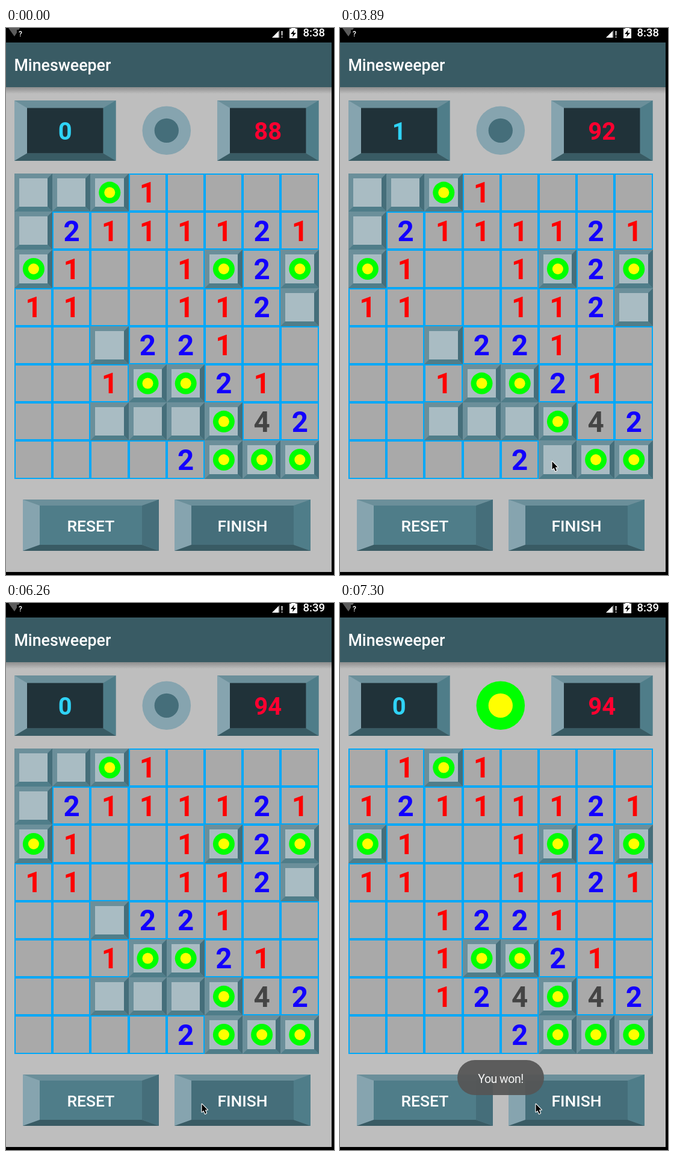
Animation of 545 by 906 pixels, one loop 8 s. Source, as an HTML page with a canvas:

```html
<!DOCTYPE html>
<html lang="en">
<head>
<meta charset="utf-8">
<title>Minesweeper</title>
<style>
html, body { margin: 0; width: 100%; height: 100%; overflow: hidden; background: #000; }
canvas { display: block; }
</style>
</head>
<body>
<canvas id="stage" width="545" height="906"></canvas>
<script>
const ctx = document.getElementById('stage').getContext('2d');
const LOOP = 8000, UNFLAG = 3440, REFLAG = 4790, WIN = 6710, TICK = 150;
const LIGHT = '#86a4af', MID = '#6b8f9a', TEAL = '#4f7d89', DEEP = '#456e7a', DARK = '#395b64';

// * mine, # safe but still covered, . open
const FIELD = [
  '##*.....',
  '#.......',
  '*....*.*',
  '.......#',
  '..#.....',
  '...**...',
  '..###*..',
  '.....***'
];
const LEFT = 14, TOP = 241, CELL = 63.2;
const COUNT_COLORS = ['', '#ff0000', '#1200ff', '', '#444444'];

// Pointer glides: start and end time, then where it goes.
const GLIDES = [
  [750, 750, 497, 521], [750, 900, 448, 522], [900, 1350, 324, 697], [1650, 2250, 364, 730],
  [2850, 3150, 352, 717], [5100, 5700, 226, 812], [5700, 6150, 325, 829]
];

const clamp = v => Math.min(1, Math.max(0, v));
const isMine = (col, row) => FIELD[row]?.[col] === '*';

function countMines(col, row) {
  let count = 0;
  for (let dy = -1; dy <= 1; dy++)
    for (let dx = -1; dx <= 1; dx++) count += isMine(col + dx, row + dy);
  return count;
}

function poly(color, ...p) {
  ctx.fillStyle = color;
  ctx.beginPath();
  for (let i = 0; i < p.length; i += 2) ctx.lineTo(p[i], p[i + 1]);
  ctx.closePath();
  ctx.fill();
}

function rect(color, x, y, w, h) {
  ctx.fillStyle = color;
  ctx.fillRect(x, y, w, h);
}

function disc(color, x, y, r) {
  ctx.fillStyle = color;
  ctx.beginPath();
  ctx.arc(x, y, r, 0, 7);
  ctx.fill();
}

function text(str, x, y, size, color = '#fff', weight = 500, align = 'center') {
  ctx.font = `${weight} ${size}px Roboto, sans-serif`;
  ctx.textAlign = align;
  ctx.fillStyle = color;
  ctx.fillText(str, x, y);
}

// Box with mitred edges; bx, by are the edge widths.
function bevel(x, y, w, h, bx, by, face, [left, top, right, bottom]) {
  const r = x + w, b = y + h;
  rect(top, x, y, w, h);
  poly(left, x, y, x + bx, y + by, x + bx, b - by, x, b);
  poly(right, r, y, r, b, r - bx, b - by, r - bx, y + by);
  poly(bottom, x, b, x + bx, b - by, r - bx, b - by, r, b);
  rect(face, x + bx, y + by, w - 2 * bx, h - 2 * by);
}

function rings(x, y, r, outer = '#00ff00', inner = '#ffff00') {
  disc(outer, x, y, r);
  disc(inner, x, y, r / 2);
}

function statusBar(t) {
  poly('#5c5c5c', 4, 0, 23, 0, 14, 14);
  rect('#000', 18, 3, 10, 14);
  text('?', 24, 14, 12);
  poly('#4d4d4d', 455, 3, 455, 16, 442, 16);
  poly('#fff', 453, 5, 453, 16, 442, 16);
  text('!', 458.5, 16, 15);
  rect('#fff', 474, 0, 7, 3);
  rect('#fff', 471, 1, 13, 16);
  poly('#000', 479, 3, 473, 10, 477, 10, 476, 15, 482, 8, 478, 8);
  text(t < 5690 ? '8:38' : '8:39', 530, 14, 18.5, '#fff', 500, 'right');
}

function screen() {
  rect('#000', 0, 0, 545, 906);
  rect('#bebebe', 0, 24, 541, 877);
  const shadow = ctx.createLinearGradient(0, 98, 0, 109);
  shadow.addColorStop(0, '#8e8e8e');
  shadow.addColorStop(1, '#bebebe');
  rect(shadow, 0, 98, 541, 11);
  rect(DARK, 0, 24, 541, 74);
  text('Minesweeper', 13.4, 71, 26.8, '#fff', 500, 'left');
}

function display(x, value, color) {
  bevel(x, 120, 168.5, 100, 21, 12.5, '#203239', [LIGHT, MID, TEAL, DARK]);
  text(value, x + 84.3, 185, 40, color, 700);
}

function button(x, label, face, right) {
  bevel(x, 781, 226, 85, 28, 10, face, [LIGHT, MID, right, DARK]);
  text(label, x + 113, 834, 26.5);
}

function cell(col, row, t) {
  const x = Math.round(LEFT + col * CELL), y = Math.round(TOP + row * CELL);
  const w = Math.round(LEFT + (col + 1) * CELL) - x, h = Math.round(TOP + (row + 1) * CELL) - y;
  const cx = LEFT + (col + 0.5) * CELL + 0.3, cy = TOP + (row + 0.5) * CELL;
  const mine = isMine(col, row);
  if (mine || (FIELD[row][col] === '#' && t < WIN)) {
    bevel(x, y, w, h, 8, 8, '#a9bcc3', [MID, MID, DEEP, TEAL]);
    const unflagged = col === 5 && row === 7 && t >= UNFLAG && t < REFLAG;
    if (mine && !unflagged) rings(cx, cy, 18);
    return;
  }
  rect('#00a8f8', x, y, w, h);
  rect('#a9a9a9', x + 2, y + 2, w - 4, h - 4);
  const count = countMines(col, row);
  if (count) text(count, cx, cy + 16.7, 47.5, COUNT_COLORS[count], 700);
}

function toast(t) {
  ctx.globalAlpha = clamp(Math.floor((t - WIN) / 147) / 4);
  ctx.fillStyle = 'rgba(85, 85, 85, .93)';
  ctx.beginPath();
  ctx.roundRect(195, 757, 144, 58, 29);
  ctx.fill();
  ctx.letterSpacing = '-0.5px';
  text('You won!', 267, 795, 19.5, '#f4f4f4', 400);
  ctx.letterSpacing = '0px';
  ctx.globalAlpha = 1;
}

function pointer(t) {
  const sampled = Math.floor((t + 10) / TICK) * TICK;
  let x = -50, y = -50;
  for (const [start, end, toX, toY] of GLIDES) {
    if (sampled < start) break;
    const k = start === end ? 1 : clamp((sampled - start) / (end - start));
    x += (toX - x) * k;
    y += (toY - y) * k;
  }
  ctx.save();
  ctx.translate(x, y);
  ctx.lineJoin = 'round';
  ctx.strokeStyle = '#fff';
  ctx.lineWidth = 2.2;
  const arrow = [0.5, 1, 0.5, 14, 3.5, 11.5, 5.8, 17, 8, 16, 5.8, 10.5, 9.8, 10.5];
  poly('#000', ...arrow);
  ctx.stroke();
  poly('#000', ...arrow);
  ctx.restore();
}

function draw(now) {
  const t = now % LOOP;
  screen();
  statusBar(t);
  display(14, t >= UNFLAG && t < REFLAG ? 1 : 0, '#2fd3f6');
  display(351, 88 + Math.floor((Math.min(t, WIN) + 115) / 1000), '#ff0030');
  rings(266.8, 169.8, 40.3, ...(t < WIN ? [LIGHT, DEEP] : []));
  FIELD.forEach((line, row) => [...line].forEach((_, col) => cell(col, row, t)));
  button(28, 'RESET', TEAL, DEEP);
  button(280, 'FINISH', DEEP, TEAL);
  toast(t);
  pointer(t);
  requestAnimationFrame(draw);
}
requestAnimationFrame(draw);
</script>
</body>
</html>
```
